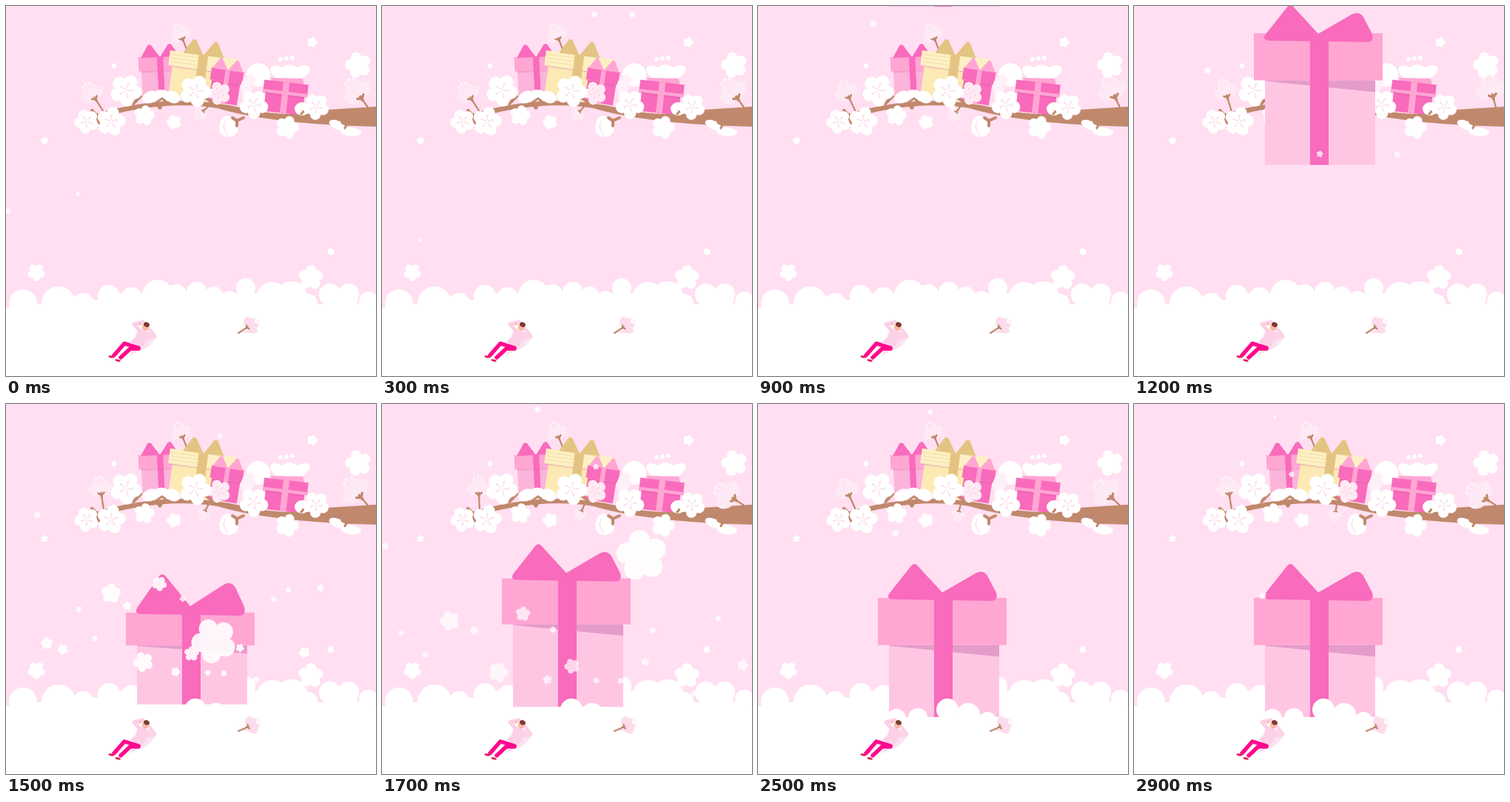
Write an HTML page with a canvas that moves like this. It is 500 px wide and 500 px high and loops after 3000 ms.

```html
<!DOCTYPE html>
<html lang="en">
<head>
<meta charset="utf-8">
<title>Spring gift</title>
<style>
html, body { margin: 0; width: 100%; height: 100%; overflow: hidden; background: #ffdff1; }
canvas { display: block; width: 500px; height: 500px; }
</style>
</head>
<body>
<canvas id="stage" width="500" height="500"></canvas>
<script>
const LOOP = 3000, STEP = 100, LAND = 1320, TAU = Math.PI * 2;
const SKY = '#ffdff1', WOOD = '#c0886c', HOT = '#f96bbc', PINK = '#ffa6d3',
  SOFT = '#ffc6e4', SHADE = '#e49cca', PALE = '#fff0f7', BLUSH = '#fdeaf4',
  LINE = '#fbd5e7', SKIN = '#fbb9a0', PANTS = '#ff0a8e', SHIRT = '#fcd0e6';
const c = document.getElementById('stage').getContext('2d');

const clamp = v => Math.max(0, Math.min(1, v));
const arch = v => Math.sin(Math.PI * clamp(v));
const random = n => {
  const v = Math.sin(n * 12.9898) * 43758.5453;
  return v - Math.floor(v);
};

// Keys are [time, value], joined by straight lines
function tween(keys, t) {
  let v = keys[0][1];
  for (let i = 1; i < keys.length; i++) {
    const [t0, v0] = keys[i - 1], [t1, v1] = keys[i];
    if (t > t0) v = v0 + (v1 - v0) * clamp((t - t0) / (t1 - t0));
  }
  return v;
}

function at(x, y, rot, paint) {
  c.save();
  c.translate(x, y);
  c.rotate(rot);
  paint();
  c.restore();
}
function trace(p) {
  c.beginPath();
  for (let i = 0; i < p.length; i += 2) c.lineTo(p[i], p[i + 1]);
}
function poly(color, ...p) {
  c.fillStyle = color;
  trace(p);
  c.fill();
}
function line(color, width, ...p) {
  c.strokeStyle = color;
  c.lineWidth = width;
  c.lineCap = c.lineJoin = 'round';
  trace(p);
  c.stroke();
}
function oval(color, x, y, rx, ry = rx, rot = 0) {
  c.fillStyle = color;
  c.beginPath();
  c.ellipse(x, y, rx, ry, rot, 0, TAU);
  c.fill();
}
function rect(color, x, y, w, h) {
  c.fillStyle = color;
  c.fillRect(x, y, w, h);
}

function flower(x, y, r, rot = 0, alpha = 1, color = '#fff') {
  at(x, y, rot, () => {
    c.globalAlpha = alpha;
    c.fillStyle = color;
    c.beginPath();
    c.arc(0, 0, r * .5, 0, TAU);
    for (let i = 0; i < 5; i++) {
      const a = i * TAU / 5, px = Math.cos(a) * r * .58, py = Math.sin(a) * r * .58;
      c.moveTo(px + r * .41, py);
      c.arc(px, py, r * .41, 0, TAU);
    }
    c.fill();
  });
}

function openFlower(x, y, r, rot, color) {
  flower(x, y, r, rot, 1, color);
  at(x, y, rot, () => {
    for (let i = 0; i < 5; i++) {
      c.rotate(TAU / 5);
      line(LINE, 1, r * .1, 0, r * .36, -r * .06);
      oval(LINE, r * .4, -r * .06, 1.2);
    }
  });
}

// Blossom seen from the side, swinging around the foot of its stem
function sprig(x, y, deg, size, stem, color = BLUSH) {
  at(x, y, deg * Math.PI / 180, () => {
    line(WOOD, 2.2, 0, 0, 0, -stem);
    c.translate(0, -stem);
    c.scale(size, size);
    for (let s = -5; s <= 5; s += 5) {
      line(PALE, 1, 0, -8, s, -25 + Math.abs(s) / 2);
      oval(PALE, s, -25 + Math.abs(s) / 2, 2.2);
    }
    for (const s of [-1, 1]) oval(color, s * 9, -7, 6, 9, s * .8);
    for (const s of [-1, 1]) oval(color, s * 4.5, -11, 6, 10, s * .25);
    line(WOOD, 2.6, -4, -3, 0, 0, 4, -3);
    line(WOOD, 3, 0, 2, 0, -3);
  });
}

// x, y is the middle of the lid's upper edge
function present(x, y, rot, w, lid, h, bow, bowHeight, [top, body, ribbon, knot]) {
  at(x, y, rot, () => {
    const b = w * .44;
    rect(body, -b, lid, b * 2, h - lid);
    rect(top, -w / 2, 0, w, lid);
    line('rgba(200,70,150,.25)', 1.5, -b, lid + 1, b, lid + 1);
    rect(ribbon, -w * .07, 0, w * .14, h);
    for (const s of [-1, 1])
      poly(knot, 0, 1, s * bow, 1, s * bow * .6, -bowHeight, s * bow * .45, -bowHeight);
  });
}

function presents() {
  present(208, 68, -.05, 59, 19, 55, 26, 16, [PINK, '#fcb4da', HOT, HOT]);
  present(267, 66, .13, 91, 20, 62, 28, 19, ['#fdf0c4', '#fde9b4', '#e3c482', '#e3c482']);
  for (let y = 65; y < 80; y += 5) line('#f5dfa5', 1, 223, y, 260, y + 5);
  present(300, 86, .16, 44, 17, 46, 21, 14, [HOT, HOT, PINK, PINK]);
  oval('#fff', 341, 93, 16);
  oval(PALE, 327, 106, 9, 14, .4);
  oval('#fff', 383, 91, 12);
  oval('#fff', 369, 90, 13, 8, .6);
  oval('#fff', 397, 90, 15, 8, -.5);
  for (let i = 0; i < 3; i++) oval('#fff', 371 + i * 8, 72 - i, 3);
  poly(PINK, 358, 97, 401, 98, 403, 107, 359, 102);
  present(379, 103, .115, 60, 17, 42, 0, 0, [HOT, HOT, PINK, PINK]);
  line(PINK, 4, 349, 114, 406, 121);
}

function branch(t) {
  sprig(244, 58, -22, .9, 13);
  presents();

  c.fillStyle = WOOD;
  c.beginPath();
  c.moveTo(500, 136);
  c.lineTo(437, 140);
  c.quadraticCurveTo(385, 153, 320, 138);
  c.quadraticCurveTo(225, 115, 121, 146);
  c.lineTo(122, 153);
  c.quadraticCurveTo(210, 126, 285, 138);
  c.quadraticCurveTo(360, 160, 500, 163);
  c.fill();
  line(WOOD, 4, 125, 158, 124, 149, 116, 141);
  line(WOOD, 4, 172, 132, 182, 122);
  line(WOOD, 4, 203, 131, 208, 138, 212, 130);
  line(WOOD, 4, 280, 132, 270, 124);

  sprig(132, 143, tween([[600, -33], [1700, -3], [2100, -39], [2900, -9]], t), 1, 20);
  sprig(489, 137, tween([[600, -35], [1200, -15], [1700, -57], [2100, -36], [2900, -57]], t), 1.25, 14);
  sprig(274, 135, -133 - t / 75, .6, 9);

  for (let i = -1; i <= 1; i++) oval('#fff', 210 + i * 15, 121 + i * i * 2, 11, 8, i * .4);
  line(WOOD, 3, 205, 129, 211, 125, 216, 129);
  openFlower(162, 114, 22, .2);
  openFlower(109, 156, 17, .5);
  openFlower(142, 156, 20, -.1);
  openFlower(288, 118, 16, .6, BLUSH);
  openFlower(256, 115, 22, .1);
  openFlower(335, 133, 20, .3);
  oval('#fff', 298, 159, 9, 11, .4);
  oval('#fff', 301, 165, 13, 12);
  line(LINE, 1, 296, 155, 294, 164, 299, 174);
  line(WOOD, 4, 306, 151, 312, 155, 321, 151);
  line(WOOD, 4, 312, 155, 312, 162);
  oval('#fff', 400, 139, 10, 9);
  line(WOOD, 3, 399, 146, 404, 140, 410, 141);
  openFlower(419, 136, 18, .4);
  oval('#fff', 448, 161, 12, 6, .4);
  oval('#fff', 466, 170, 14, 6, .1);
  line(WOOD, 3, 454, 158, 460, 161, 458, 165);
}

function stillFlowers() {
  [[414, 49, 7], [476, 80, 18], [146, 81, 4], [52, 182, 5], [41, 360, 12],
   [412, 367, 17], [439, 332, 5], [187, 148, 14], [227, 157, 10], [380, 164, 16]]
    .forEach((p, i) => flower(...p, i * .7));
}

function backCloud() {
  const puffs = [
    [23, 402, 19], [71, 402, 23], [104, 403, 15], [139, 392, 15], [170, 395, 15],
    [205, 391, 21], [230, 390, 14], [258, 387, 14], [281, 391, 12], [302, 398, 13],
    [324, 381, 13], [360, 395, 22], [386, 393, 21], [408, 402, 13], [438, 390, 15],
    [463, 389, 14], [490, 399, 13]
  ];
  for (const p of puffs) oval('#fff', ...p);
  rect('#fff', 0, 408, 500, 92);
  rect('#fff', 24, 403, 470, 6);
  rect('#fff', 110, 397, 300, 8);
  rect('#fff', 150, 388, 235, 12);
  rect('#fff', 430, 392, 45, 14);
}
function frontCloud() {
  for (const p of [[187, 425, 13], [216, 424, 13], [256, 413, 15], [284, 420, 16], [310, 428, 12]])
    oval('#fff', ...p);
  rect('#fff', 165, 423, 170, 77);
}

// Falls, squashes on landing, springs back and sinks into the cloud
function bigGift(t) {
  if (t < 900) return;
  const squash = arch((t - LAND) / 390);
  const end = 406 * clamp((t - 880) / (LAND - 880)) ** 2 + 34 * Math.sin(clamp((t - 1680) / 320) * TAU / 4);
  const height = 178 * (1 - .305 * squash);
  const lid = end - height, body = lid + height * .358;
  const slip = t < LAND ? 8 : 0;
  const top = lid - 46 - 6 * squash + slip, h = lid + 3 + slip - top;
  const y = k => top + h * k;

  rect(SOFT, 177, body, 149, end - body);
  poly(SHADE, 177, body, 326, body, 326, body + height * .088, 177, body + 1);
  rect(PINK, 162, lid, 174, body - lid);
  rect(HOT, 238, y(.82), 25, end - y(.82));
  c.fillStyle = HOT;
  c.beginPath();
  c.moveTo(206, y(.08));
  c.quadraticCurveTo(211, y(-.07), 217, y(.08));
  c.lineTo(249, y(.79));
  c.lineTo(294, y(.26));
  c.quadraticCurveTo(304, y(.15), 310, y(.33));
  c.lineTo(322, y(.8));
  c.quadraticCurveTo(325, y(1.02), 315, y(1.02));
  c.lineTo(183, y(.98));
  c.quadraticCurveTo(172, y(.97), 178, y(.8));
  c.fill();
}

function person(t) {
  at(0, -3 * arch((t - LAND) / 180), 0, () => {
    poly('#f9e3ef', 204, 448, 190, 462, 166, 473, 172, 464, 195, 447);
    line(SHIRT, 5, 179, 437, 173, 430, 185, 427);
    line(SHIRT, 5, 193, 436, 201, 446, 192, 448);
    poly(SHIRT, 179, 435, 188, 438, 196, 443, 186, 459, 180, 462, 168, 454, 175, 447);
    line(PANTS, 5.5, 179, 462, 160, 456, 146, 472);
    line(PANTS, 5.5, 179, 463, 168, 463, 155, 475);
    oval('#e0264f', 142, 474, 3.8, 1.5, .25);
    oval('#e0264f', 151, 479, 3.8, 1.5, .25);
    oval(SKIN, 188, 434, 4, 5, -.4);
    oval('#7a3b32', 190, 430.5, 4, 3.2, .5);
    oval(SKIN, 181, 430, 2, 1.5);
  });
}

// Loose petals, each passing x, y at a given time: [time, x, y, radius, sideways speed]
function drift(t) {
  const petals = [
    [0, 97, 254, 3, -.15], [0, 3, 277, 4, -.15], [1200, 251, 200, 4.5, -.04],
    [1200, 356, 201, 4.5, .02], [1200, 99, 87, 5, -.19], [1500, 289, 43, 4, 0],
    [2100, 198, 91, 5, -.03], [2900, 213, 95, 4, -.05], [2900, 190, 18, 2.5, -.05]
  ];
  for (const [when, x, y, r, speed] of petals) {
    const age = t - when, py = y + age * .21;
    if (age <= 800 && py > -10)
      flower(x + age * speed, py, r, t / 500, .75 * clamp((400 - py) / 90));
  }
}

// Petals thrown up from the cloud around x
function burst(t, start, count, x, spread, rise) {
  const u = (t - start) / 200;
  if (u <= 0 || u > 2.8) return;
  for (let i = 0; i < count; i++) {
    const dx = (i / (count - 1) - .5) * spread;
    const up = rise * (.1 + .9 * random(i + start));
    const r = 4 + 10 * random(i * 3 + count) ** 2;
    flower(x + dx * u ** .6, 405 - up * u * (2.6 - u) / 1.6,
      r * clamp(.4 + u * .6), i + u * .8, .9 * clamp(2.8 - u));
  }
}
function bigPetal(t) {
  const u = (t - 1500) / 200;
  if (u > -1 && u < 1.6) flower(281 + 70 * u, 320 - 115 * u, 31 + 4 * u, .5 + u * .3, .9);
}

function draw(t) {
  rect(SKY, 0, 0, 500, 500);
  branch(t);
  stillFlowers();
  backCloud();
  bigGift(t);
  frontCloud();
  oval('#f9e6f0', 329, 440, 12, 2);
  sprig(314, 442, tween([[1200, 57], [1500, 66]], t), .75, 13, '#fcdcec');
  person(t);
  drift(t);
  burst(t, 1300, 18, 240, 370, 180);
  burst(t, 1900, 12, 205, 230, 110);
  bigPetal(t);
}

const began = performance.now();
function frame() {
  const t = (performance.now() - began) % LOOP;
  draw(Math.floor(t / STEP) * STEP);
  requestAnimationFrame(frame);
}
frame();
</script>
</body>
</html>
```
